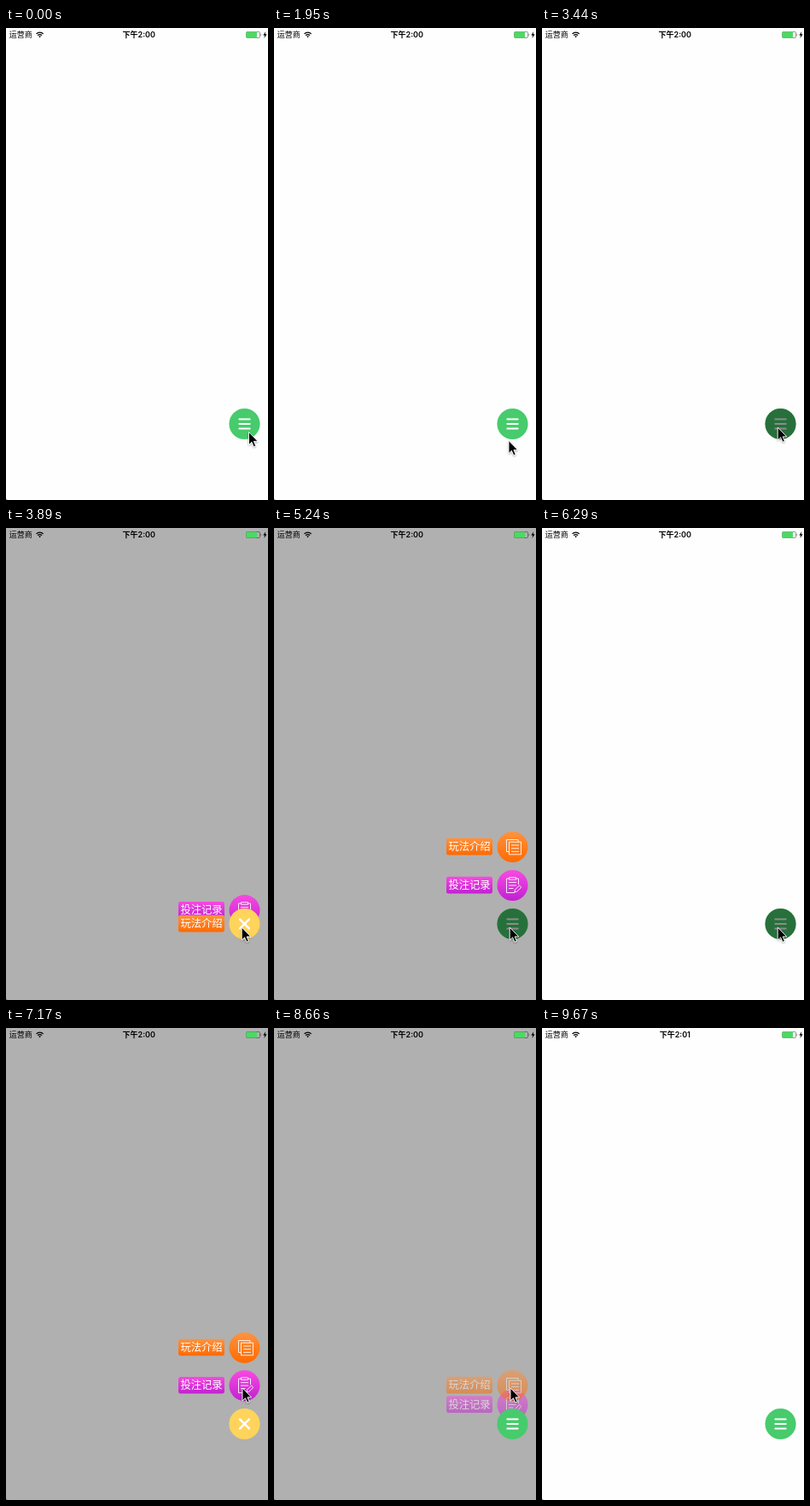
An HTML page that plays this animation: 307 px wide and 552 px high, repeating every 9.77 s.

```html
<!DOCTYPE html>
<html lang="zh">
<head>
<meta charset="utf-8">
<style>
  html, body { margin: 0; width: 100%; height: 100%; overflow: hidden; background: #fefefe; }
  svg { display: block; width: 307px; height: 552px; }
  text { font-family: Inter, "Noto Sans CJK SC", "Noto Sans CJK", sans-serif; }
  .label { font-size: 12.3px; font-weight: 300; fill: #fff; text-anchor: middle; }
  .line { fill: none; stroke: #fff; stroke-width: .95; stroke-linejoin: round; opacity: .92; }
  .press { fill: #000; opacity: .45; }
</style>
</head>
<body>
<svg viewBox="0 0 307 552">
  <defs>
    <linearGradient id="orange" x2="0" y2="1">
      <stop stop-color="#ff9340"/><stop offset="1" stop-color="#ff6a00"/>
    </linearGradient>
    <linearGradient id="purple" x2="0" y2="1">
      <stop stop-color="#f84ae2"/><stop offset="1" stop-color="#c021d2"/>
    </linearGradient>
    <filter id="soft" x="-50%" y="-50%" width="200%" height="200%">
      <feDropShadow dx="0" dy="1" stdDeviation=".8" flood-opacity=".35"/>
    </filter>
  </defs>

  <rect width="307" height="552" fill="#fefefe"/>
  <rect id="dim" width="307" height="552" fill="#b0b0b0"/>
  <path d="M0 550.5Q.2 551.8 2 552H0Z" fill="#555"/>

  <g id="status">
    <text x="3.7" y="11" font-size="9">运营商</text>
    <g fill="none" stroke="#000" stroke-width="1.2">
      <path d="M35.5 6.8A5.7 5.7 0 0 1 43.7 6.8"/>
      <path d="M37.1 8.7A3.5 3.5 0 0 1 42.1 8.7"/>
    </g>
    <path d="M39.6 11.3L38.2 9.8Q39.6 8.8 41 9.8Z"/>
    <text id="clock" x="155.8" y="11" font-size="9" font-weight="600" text-anchor="middle"></text>
    <rect x="281.5" y="4.5" width="16" height="7" rx="1.2" fill="none" stroke="#000" stroke-opacity=".4"/>
    <rect x="281.4" y="4.4" width="12.6" height="7.2" rx="1" fill="#4cd964"/>
    <path d="M298.6 6.6Q300 8 298.6 9.4Z" fill="#333"/>
    <path d="M304.4 4L301.3 8.4H303.2L302.4 12L305.6 7.3H303.6Z"/>
  </g>

  <!-- menu items, drawn around a circle centre at y = 0 -->
  <g id="record">
    <rect x="202" y="-10.2" width="54" height="19.6" rx="2.5" fill="url(#purple)"/>
    <text class="label" x="229" y="4.3">投注记录</text>
    <circle cx="279.5" r="18" fill="url(#purple)"/>
    <g class="line">
      <path d="M275.5 -8H272.5V8.5H282M283.5 -8H286.5V-1"/>
      <path d="M275.5 -9.3H283.5V-6.8H275.5ZM275 -3.5H284M275 0H284M275 3.5H280.5"/>
      <path d="M281.8 7.8L282.5 5L287.5 0L289.8 2.2L284.7 7.2Z"/>
    </g>
    <circle id="recordPress" class="press" cx="279.5" r="18"/>
  </g>
  <g id="rules">
    <rect x="202" y="-10.2" width="54" height="19.6" rx="2.5" fill="url(#orange)"/>
    <text class="label" x="229" y="4.3">玩法介绍</text>
    <circle cx="279.5" r="18" fill="url(#orange)"/>
    <g class="line">
      <path d="M275.5 5.5H272.5V-8.5H286V-5.8"/>
      <path d="M275.5 -5.8H289.5V8.8H275.5ZM278 -2H287M278 1.7H287M278 5.4H287"/>
    </g>
  </g>

  <g transform="translate(279.5 463)">
    <g id="menu">
      <circle r="18.1" fill="#47cb6c"/>
      <path d="M-6.2 -5.4H6.2M-6.2 0H6.2M-6.2 5.4H6.2" stroke="#fff" stroke-width="2" stroke-linecap="round"/>
    </g>
    <g id="close">
      <circle r="18.1" fill="#fed45c"/>
      <path d="M-5.4 -5.4L5.4 5.4M5.4 -5.4L-5.4 5.4" stroke="#fff" stroke-width="2.4" stroke-linecap="round"/>
    </g>
    <circle id="menuPress" class="press" r="18.1"/>
  </g>

  <path id="cursor" d="M0 0V15L3.4 11.8L5.8 17.2L8.2 16.2L5.9 10.9H10.6Z"
        stroke="#fff" stroke-width=".9" filter="url(#soft)"/>
</svg>

<script>
// Time is counted in beats: the picture refreshes once per beat.
const LOOP = 9770, BEAT = 149.3, HOME = 463;
const $ = id => document.getElementById(id);
const show = (id, on) => $(id).setAttribute('visibility', on ? 'visible' : 'hidden');
const within = (t, a, b) => t >= a && t < b;

// The button is held down for a while, then the menu opens or shuts.
const first = { press: 23, open: 26, hold: 35, shut: 37 };
const second = { press: 42, open: 43, hold: 56, shut: 58 };

// Pointer moves: start beat, length, end point
const moves = [
  [12, 1, 275, 482.5],
  [13, 8, 276.2, 467],
  [44, 3, 277, 421],
  [51, 2, 276.2, 474],
  [53, 2, 277, 421],
  [59, 4, 312, 480]
];

function pointer(t) {
  let x = 284.5, y = 472.5;
  for (const [start, length, endX, endY] of moves) {
    const k = Math.min(1, Math.max(0, (t - start) / length));
    x += (endX - x) * k;
    y += (endY - y) * k;
  }
  return [x, y];
}

// Critically damped spring from 0 to 1
function spring(beats) {
  const w = beats * 1.31;
  return 1 - (1 + w) * Math.exp(-w);
}

function place(id, rise, alpha) {
  $(id).setAttribute('transform', `translate(0 ${HOME - rise})`);
  $(id).setAttribute('opacity', alpha);
}

function draw(t) {
  const run = t < second.press ? first : second;
  const open = within(t, run.open, run.shut);
  const visible = open || t === run.shut;
  const fold = open ? 1 : .5;
  const down = within(t, run.press, run.open) || within(t, first.hold, first.shut);

  for (const id of ['dim', 'record', 'rules']) show(id, visible);
  if (visible) {
    const age = t - run.open;
    place('record', 45 * spring(age + .95) * fold, fold);
    place('rules', 90 * spring(age) * fold, fold);
  }
  show('close', open && !down);
  show('menu', !open || down);
  show('menuPress', down);
  show('recordPress', within(t, second.hold, second.shut));
  $('clock').textContent = t < 61 ? '下午2:00' : '下午2:01';
  $('cursor').setAttribute('transform', `translate(${pointer(t)})`);
}

function frame() {
  draw(Math.floor(performance.now() % LOOP / BEAT));
  requestAnimationFrame(frame);
}
frame();
</script>
</body>
</html>
```
